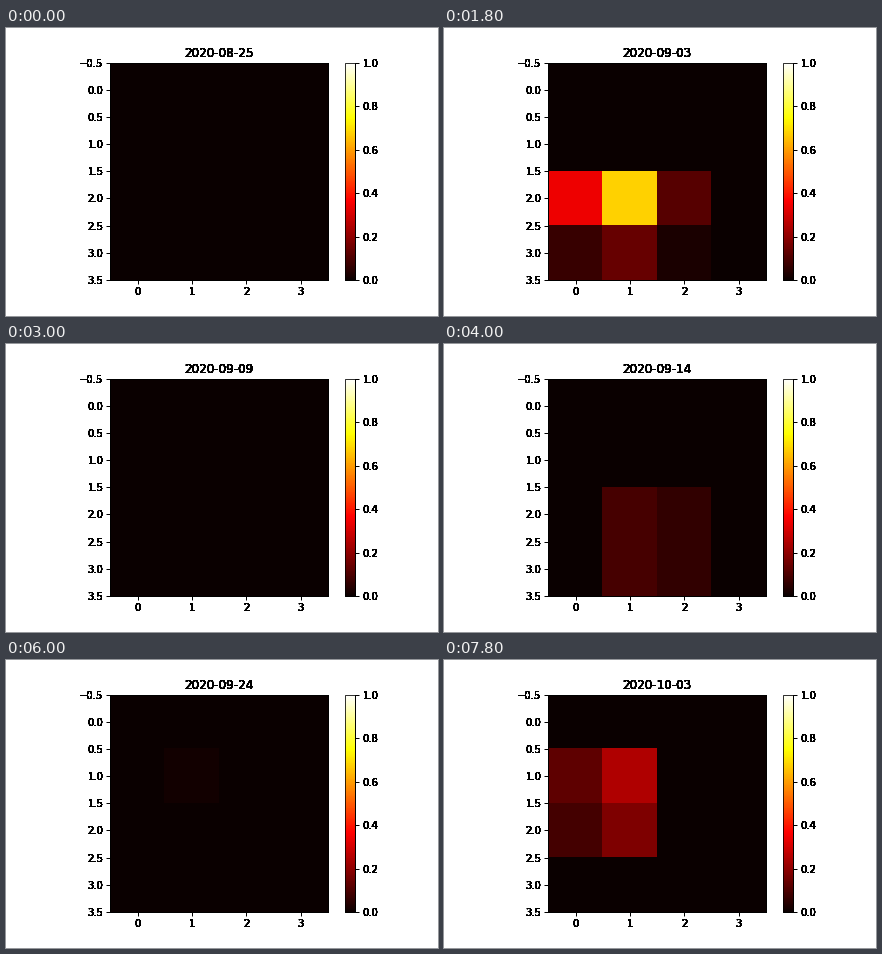
Write a matplotlib script that moves like this. It is 432 by 288 pixels and loops after 8 s.

```python
import numpy as np
import matplotlib.pyplot as plt
from matplotlib.animation import FuncAnimation

FRAMES, INTERVAL = 40, 200
START = np.datetime64("2020-08-25")
LIFE = 4  # days a spot takes to build up, and again to fade

# peak day, column, row, strength
SPOTS = [
    (4, 1, 2.7, 0.34),
    (9, 0.8, 2.17, 0.95),
    (20, 1.4, 2.5, 0.3),
    (24, 2, 1.82, 0.23),
    (33, 1, 1, 0.06),
    (39, 0.68, 1.41, 0.6),
]
ROWS, COLS = np.mgrid[:4, :4]


def tent(distance, reach=1):
    return np.maximum(0, 1 - np.abs(distance) / reach)


def levels(day):
    grid = np.zeros((4, 4))
    for peak, x, y, strength in SPOTS:
        reach = 1 + 0.5 * strength ** 4  # strong spots spread sideways
        shape = tent(COLS - x, reach) * tent(ROWS - y)
        grid += strength * tent(day - peak, LIFE) * shape
    return grid


def harden(text, passes=24):
    """Paint a text repeatedly so that its soft edges turn solid."""
    draw = text.draw

    def repeated(renderer):
        for _ in range(passes):
            draw(renderer)

    text.draw = repeated


plt.rcParams.update({
    "font.family": "DejaVu Sans",
    "font.size": 10,
    "axes.titlesize": 12,
    "axes.linewidth": 1,
    "figure.subplot.bottom": 0.125,
})
for side in ("xtick", "ytick"):
    plt.rcParams.update({
        f"{side}.major.width": 1,
        f"{side}.major.size": 4,
        f"{side}.major.pad": 3,
    })

fig, ax = plt.subplots(figsize=(6, 4), dpi=72, facecolor="white")
image = ax.imshow(levels(0), cmap="hot", vmin=0, vmax=1,
                  interpolation="nearest")
ax.set_xticks(range(4))
ax.set_yticks(np.arange(-0.5, 4, 0.5))
title = ax.set_title(str(START))

# Solid frame below the colours, slightly see-through one above them
bar = fig.colorbar(image, ax=ax)
bar.ax.patch.set(edgecolor="black", linewidth=1)
bar.outline.set_linewidth(0.8)

for text in (title, *ax.get_xticklabels(), *ax.get_yticklabels(),
             *bar.ax.get_yticklabels()):
    harden(text)


def update(day):
    image.set_data(levels(day))
    title.set_text(str(START + day))
    return image, title


anim = FuncAnimation(fig, update, frames=FRAMES, interval=INTERVAL,
                     init_func=lambda: update(0), repeat=True,
                     repeat_delay=0, blit=False)
plt.show()
```
